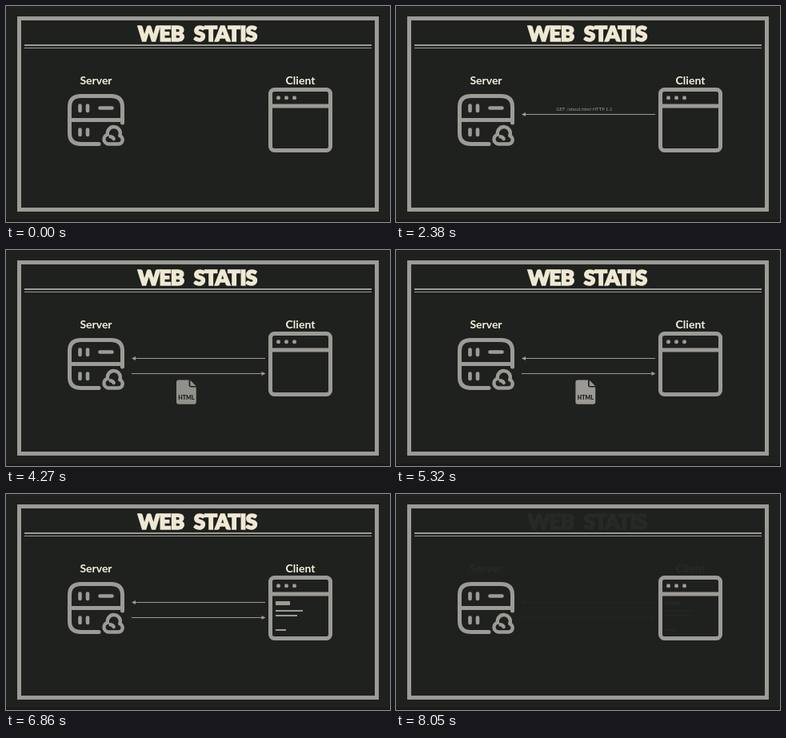
Animation of 480 by 270 pixels, one loop 9.59 s. Source, as an HTML page:

```html
<!DOCTYPE html>
<html lang="id">
<head>
<meta charset="utf-8">
<title>Web Statis</title>
<style>
  html, body { margin: 0; width: 100%; height: 100%; overflow: hidden; background: #1f211e; }
  svg { display: block; width: 100%; height: 100%; font-family: Lato, sans-serif; }
  .line { fill: none; stroke: #9c9b95; stroke-width: 5; stroke-linecap: round; stroke-linejoin: round; }
  .thin { stroke: #9c9b95; stroke-width: 1; }
  .grey { fill: #9c9b95; }
  .title { font-size: 26px; font-weight: 900; letter-spacing: -.8px; fill: #efe8d3; stroke: #efe8d3; stroke-width: 1.5; }
  .label { font-size: 14px; font-weight: 700; fill: #f4eedd; }
  .middle { text-anchor: middle; }
</style>
</head>
<body>
<svg viewBox="0 0 480 270">
  <rect width="480" height="270" fill="#1f211e"/>
  <rect y="267" width="480" height="3" fill="#1a1a18"/>
  <rect class="line" x="16.5" y="15.5" width="447" height="239" style="stroke-linejoin:miter"/>
  <rect class="grey" x="23" y="48" width="434" height="2"/>
  <rect class="grey" x="23" y="52" width="434" height="1"/>

  <!-- server -->
  <g class="line">
    <path d="M145.5 146V126Q145.5 112.5 131 112.5H94Q79.5 112.5 79.5 126V159Q79.5 172.5 94 172.5H116M80 142.5H145"/>
    <path stroke-width="4.6" d="M92.5 124.5v6.5M102 124.5v6.5M117.5 127.5h15M92.5 154.5v6.5M102 154.5v6.5"/>
    <path style="stroke-width:4.4" d="M128 172.5H140.5A5.3 5.3 0 0 0 142.2 162.2A8 8 0 1 0 127 160.7A6 6 0 0 0 128 172.5M130.5 163.2q3 .3 4.2 2.8"/>
  </g>

  <!-- client -->
  <rect class="line" x="330.5" y="104.5" width="75" height="76" rx="5"/>
  <path class="line" d="M331 125H405"/>
  <g class="grey">
    <circle cx="340.5" cy="114.8" r="2.5"/><circle cx="350.5" cy="114.8" r="2.5"/><circle cx="360.5" cy="114.8" r="2.5"/>
  </g>

  <g id="slide">
    <g class="middle">
      <text class="title" y="43.5"><tspan x="193.5">WEB</tspan><tspan x="274">STATIS</tspan></text>
      <text class="label" x="112.5" y="98">Server</text>
      <text class="label" x="368" y="98">Client</text>
    </g>
    <g id="request">
      <line class="thin" x1="324" y1="135.5" y2="135.5"/>
      <path class="grey" d="M0 135.5l5-2.6v5.2z"/>
    </g>
    <g id="response">
      <line class="thin" x1="157" y1="154.5" y2="154.5"/>
      <path class="grey" d="M0 154.5l-5-2.6v5.2z"/>
    </g>
    <text id="message" class="grey" x="204" y="131" font-size="6"></text>
    <g id="file">
      <path class="grey" d="M226 162.5H238.8V168.8Q238.8 171.5 241.5 171.5H248V190Q248 192.8 245.2 192.8H226Q223.2 192.8 223.2 190V165.3Q223.2 162.5 226 162.5zM240.6 162.8L247.8 169.9H240.6z"/>
      <text class="middle" x="235.6" y="186.8" font-size="7" font-weight="900" fill="#1f211e">HTML</text>
    </g>
    <path id="page" class="grey" d="M337 134h18v5h-18zM337 145h34v2h-34zM337 151h27v2h-27zM337 169h13v2h-13z"/>
  </g>
</svg>
<script>
  const LOOP = 9590, STEP = 70, TRAVEL = 120;
  const el = id => document.getElementById(id);
  const progress = (t, start, end) => Math.min(1, Math.max(0, (t - start) / (end - start)));
  const easeIn = p => p ** 2.5;
  const easeOut = p => 1 - easeIn(1 - p);
  const easeInOut = p => p < .5 ? 4 * p ** 3 : 1 - 4 * (1 - p) ** 3;
  const words = [['GET', 1330], ['/about.html', 1470], ['HTTP', 1540], ['1.1', 1610]];

  function drawArrow(id, from, to, p) {
    const arrow = el(id), tip = from + (to - from) * easeInOut(p);
    arrow.style.display = p > 0 ? '' : 'none';
    arrow.children[0].setAttribute('x2', tip - Math.sign(to - from) * 3);
    arrow.children[1].setAttribute('transform', `translate(${tip})`);
  }

  function place(id, dx, opacity) {
    el(id).setAttribute('transform', `translate(${dx})`);
    el(id).setAttribute('opacity', opacity);
  }

  function render(t) {
    drawArrow('request', 324, 157, progress(t, 490, 1120));
    drawArrow('response', 157, 324.5, progress(t, 2870, 3500));

    el('message').textContent = words.filter(([, at]) => t >= at).map(([word]) => word).join(' ');
    const sent = easeIn(progress(t, 2240, 2800));
    place('message', -TRAVEL * sent, 1 - sent);

    const arrived = easeOut(progress(t, 3800, 4550));
    const left = easeIn(progress(t, 5200, 5950));
    place('file', TRAVEL * (arrived - 1 + left), arrived * (1 - left));

    el('page').setAttribute('opacity', progress(t, 6090, 6860));
    const fade = (1 + Math.cos(Math.PI * progress(t, 7440, 8050))) / 2;
    el('slide').setAttribute('opacity', Math.max(.04, fade));
  }

  function tick() {
    const t = performance.now() % LOOP;
    render(Math.floor(t / STEP) * STEP);
    requestAnimationFrame(tick);
  }
  tick();
</script>
</body>
</html>
```
